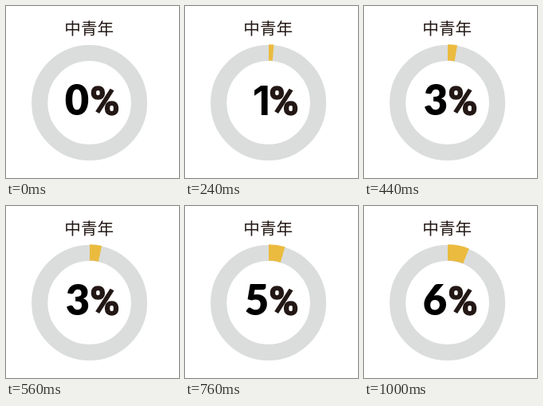
These frames come from a looping animation (217 px wide and 216 px high, 4000 ms). An HTML page with a canvas:

```html
<!DOCTYPE html>
<html lang="zh">
<head>
<meta charset="utf-8">
<title>中青年</title>
<style>
html, body { margin: 0; width: 100%; height: 100%; overflow: hidden; background: #fff; }
canvas { display: block; width: 217px; height: 216px; }
</style>
</head>
<body>
<canvas id="stage"></canvas>
<script>
const WIDTH = 217, HEIGHT = 216;
const LOOP = 4000, STEP = 40, STEPS = 25;
const PERCENT = 6, SWEEP = PERCENT / 100 * Math.PI * 2;
const RADIUS = 62.4, THICKNESS = 20.2;
const INK = '#231815';

const canvas = document.getElementById('stage');
const ctx = canvas.getContext('2d');
const scale = window.devicePixelRatio || 1;
canvas.width = WIDTH * scale;
canvas.height = HEIGHT * scale;
ctx.scale(scale, scale);

function arc(x, y, sweep, color) {
  ctx.beginPath();
  ctx.arc(x, y, RADIUS, -Math.PI / 2, sweep - Math.PI / 2);
  ctx.lineWidth = THICKNESS;
  ctx.strokeStyle = color;
  ctx.stroke();
}

// Places text by its visible edge: pass either left or right.
function label(text, { font, color, baseline, left, right, outline = 0 }) {
  ctx.font = font;
  ctx.fillStyle = ctx.strokeStyle = color;
  const box = ctx.measureText(text);
  const x = right === undefined
    ? left + box.actualBoundingBoxLeft
    : right - box.actualBoundingBoxRight;
  ctx.fillText(text, x, baseline);
  if (outline) {
    ctx.lineWidth = outline;
    ctx.strokeText(text, x, baseline);
  }
}

// Lato's 1 has a foot; Inter's is plain.
const digitFont = digit => digit === 1 ? 'bold 51.5px Inter, sans-serif' : '900 52.5px Lato, sans-serif';

function draw(step) {
  const progress = step / STEPS;
  const digit = Math.round(PERCENT * progress);
  ctx.fillStyle = '#fff';
  ctx.fillRect(0, 0, WIDTH, HEIGHT);

  label('中青年', {
    font: '20.6px "Noto Sans CJK SC", "Noto Sans CJK JP", "Noto Sans CJK", sans-serif',
    color: INK, baseline: 36, left: 74.3
  });

  arc(104.6, 121.4, Math.PI * 2, '#dadddc');
  if (step) arc(105, 120.8, SWEEP * progress, '#ebbb3f');

  label(String(digit), { font: digitFont(digit), color: '#000', baseline: 137, right: 103.8 });
  label('%', {
    font: 'bold 50.5px Roboto, sans-serif',
    color: INK, baseline: 136.5, left: 107.2, outline: 1.6
  });
}

const start = performance.now();
let shown = -1;
function tick() {
  const time = (performance.now() - start) % LOOP;
  const step = Math.min(STEPS, Math.floor(time / STEP));
  if (step !== shown) draw(shown = step);
  requestAnimationFrame(tick);
}
tick();
</script>
</body>
</html>
```
